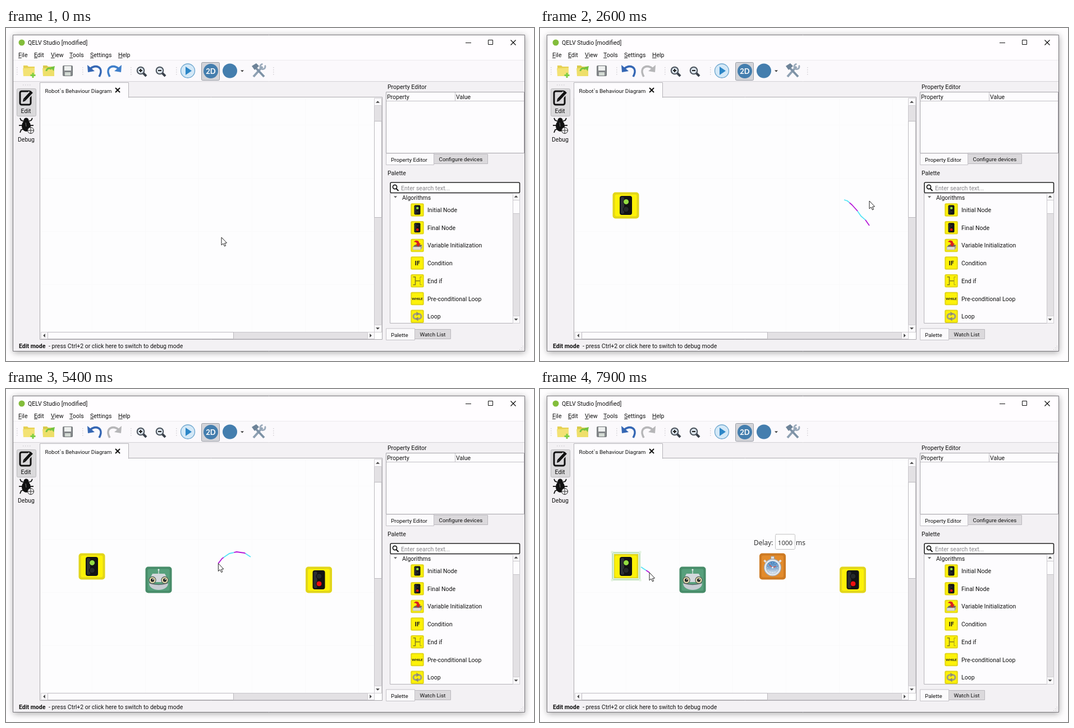
An HTML page with a canvas for the animation above (8000 ms loop, 941 by 595 pixels).

```html
<!DOCTYPE html>
<html lang="en">
<head>
<meta charset="utf-8">
<title>Diagram editor</title>
<style>
html, body { margin: 0; width: 100%; height: 100%; overflow: hidden; background: #fefdfe; }
canvas { display: block; }
</style>
</head>
<body>
<canvas id="stage" width="941" height="595"></canvas>
<script>
const LOOP = 8000, STEP = 100;
const ctx = document.getElementById('stage').getContext('2d');
const UI = '10.5px Roboto, sans-serif';
const TAB = '9.8px Roboto, sans-serif';

function box(x, y, w, h, fill, line, r = 0, lw = 1) {
  ctx.beginPath();
  ctx.roundRect(x, y, w, h, r);
  if (fill) { ctx.fillStyle = fill; ctx.fill(); }
  if (line) { ctx.strokeStyle = line; ctx.lineWidth = lw; ctx.stroke(); }
}
function disc(x, y, r, fill, line, lw = 1) {
  ctx.beginPath();
  ctx.arc(x, y, r, 0, Math.PI * 2);
  if (fill) { ctx.fillStyle = fill; ctx.fill(); }
  if (line) { ctx.strokeStyle = line; ctx.lineWidth = lw; ctx.stroke(); }
}
function poly(pts, fill) {
  ctx.beginPath();
  pts.forEach(p => ctx.lineTo(p[0], p[1]));
  ctx.closePath();
  ctx.fillStyle = fill;
  ctx.fill();
}
function line(pts, color, lw = 1) {
  ctx.beginPath();
  pts.forEach(p => ctx.lineTo(p[0], p[1]));
  ctx.strokeStyle = color;
  ctx.lineWidth = lw;
  ctx.stroke();
}
function arc(x, y, r, a, b, color, lw) {
  ctx.beginPath();
  ctx.arc(x, y, r, a, b);
  ctx.strokeStyle = color;
  ctx.lineWidth = lw;
  ctx.stroke();
}
function text(s, x, y, color = '#111', font = UI, align = 'left') {
  ctx.font = font;
  ctx.textAlign = align;
  ctx.fillStyle = color;
  ctx.fillText(s, x, y);
}
function at(x, y, scale, draw) {
  ctx.save();
  ctx.translate(x, y);
  ctx.scale(scale, scale);
  draw();
  ctx.restore();
}
function triangle(x, y, angle, color = '#444', size = 3.5) {
  ctx.save();
  ctx.translate(x, y);
  ctx.rotate(angle);
  poly([[-size, -size / 2], [size, -size / 2], [0, size / 2]], color);
  ctx.restore();
}

// Diagram blocks, drawn in a 48-unit square around the origin
function tile(fill, edge) {
  box(-23.5, -23.5, 47, 47, edge, null, 5);
  box(-19.5, -19.5, 39, 39, fill, null, 3);
}
function yellowTile() {
  tile('#fdf208', '#e2d61a');
}
function trafficLight(go) {
  yellowTile();
  box(-11, -17, 22, 34, '#121315', null, 4);
  box(-9, -15, 6, 30, '#2c3035', null, 3);
  disc(0.5, -6.5, 5, go ? '#93dc42' : '#24282a', '#0b0b0b');
  disc(0.5, 7, 5, go ? '#24282a' : '#ee1111', '#0b0b0b');
}
const blocks = {
  initial() { trafficLight(true); },
  final() { trafficLight(false); },
  variable() {
    yellowTile();
    poly([[-16, 6], [-9, -2], [17, -2], [12, 6]], '#66625c');
    box(-16, 5, 28, 11, '#dedbd6', '#9a968d');
    poly([[12, 6], [17, -2], [17, 9], [12, 16]], '#aaa69e');
    poly([[-13, -13], [-5, -18], [4, -16], [8, -7], [12, -7], [4, 5], [-6, -4], [-1, -5], [-4, -11]], '#d92020');
  },
  condition() {
    yellowTile();
    text('IF', 0, 8, '#33311c', '900 21px Lato, sans-serif', 'center');
  },
  endIf() {
    yellowTile();
    line([[-15, -14], [-7, -14], [-7, 14], [-15, 14]], '#817a20', 3);
    line([[-7, 0], [10, 0]], '#817a20', 3);
    line([[16, -14], [10, -14], [10, 14], [16, 14]], '#a69c22', 2);
  },
  whileLoop() {
    yellowTile();
    text('WHILE', 0, 5, '#33311c', '900 12px Lato, sans-serif', 'center');
  },
  loop() {
    yellowTile();
    box(-14, -9, 28, 18, null, '#a19d82', 9, 6);
    poly([[-3, -17], [7, -9], [-3, -1]], '#8e8a72');
    poly([[3, 17], [-7, 9], [3, 1]], '#8e8a72');
  },
  robot() {
    tile('#57a07c', '#478c69');
    line([[0, -18], [0, -10]], '#dde3e4', 1.3);
    disc(0, -18, 1.5, '#e9eeee');
    poly([[-14, -5], [-11, -11], [11, -11], [14, -5], [14, 4], [-14, 4]], '#d3d8dc');
    ctx.beginPath();
    ctx.moveTo(-17, 6);
    ctx.quadraticCurveTo(0, 11, 17, 6);
    ctx.bezierCurveTo(17, 22, -17, 22, -17, 6);
    ctx.fillStyle = '#c6ccd2';
    ctx.fill();
    ctx.beginPath();
    ctx.moveTo(-16, 6);
    ctx.quadraticCurveTo(0, 11, 16, 6);
    ctx.strokeStyle = '#5e696c';
    ctx.lineWidth = 1.3;
    ctx.stroke();
    for (const x of [-11, 11]) {
      disc(x, 0.5, 6, '#f0e6b4', '#55605a', 1.3);
      disc(x, 0.5, 3.2, '#26292b');
      disc(x + 1, -0.8, 1, '#fff');
    }
  },
  timer() {
    tile('#e28b2c', '#cd7a23');
    box(-3, -18, 6, 5, '#e4e2df', '#94959a', 1);
    for (const d of [-1, 1]) line([[d * 15, -11], [d * 11, -7]], '#e0e0e2', 3.5);
    const face = ctx.createLinearGradient(0, -9, 0, 13);
    face.addColorStop(0, '#3f7fbd');
    face.addColorStop(0.5, '#7fa8d0');
    face.addColorStop(1, '#dfe6f0');
    disc(0, 2, 15, '#e6ebf0', '#a5a9b0', 1.3);
    disc(0, 2, 11.5, face, '#b4c4d4', 1);
    for (let i = 0; i < 12; i++) {
      const a = i * Math.PI / 6;
      disc(9 * Math.cos(a), 2 + 9 * Math.sin(a), 0.6, '#fff');
    }
    line([[-6, -3], [0, 2], [6, 0]], '#d0504c', 1.4);
    disc(0, 2, 1.6, '#f4f4f4');
  }
};

function historyArrow(x, dir, color) {
  ctx.save();
  ctx.translate(x, 77);
  ctx.scale(dir, 1);
  ctx.beginPath();
  ctx.moveTo(-8, -4);
  ctx.bezierCurveTo(0, -13, 18, -8, 8, 10);
  ctx.strokeStyle = color;
  ctx.lineWidth = 3.6;
  ctx.stroke();
  poly([[-13, -11], [-12, 2], [0, 0]], color);
  ctx.restore();
}
function magnifier(x, plus) {
  line([[x + 3, 80], [x + 9, 86]], '#39404a', 4);
  disc(x - 1, 76, 6.3, '#d9e2ea', '#4a525c', 2);
  line([[x - 4, 76], [x + 2, 76]], '#222', 2);
  if (plus) line([[x - 1, 73], [x - 1, 79]], '#222', 2);
}
function folder(x, back, front) {
  poly([[x - 10, 67], [x - 3, 67], [x - 1, 69], [x + 10, 69], [x + 10, 86], [x - 10, 86]], back);
  poly([[x - 11, 72], [x + 10, 71], [x + 10, 86], [x - 10, 86]], front);
}

function toolbar(canRedo) {
  for (const x of [19, 136, 222, 303, 476])
    for (let y = 70; y < 86; y += 4) box(x, y, 1.5, 1.5, '#d2d0d4');
  folder(41, '#e6d052', '#f3e274');
  line([[48, 80], [48, 89]], '#7fce45', 3);
  line([[43.5, 84.5], [52.5, 84.5]], '#7fce45', 3);
  folder(76, '#d9cb4c', '#eedf6a');
  arc(77, 77, 5, Math.PI, 5.6, '#74c23f', 3);
  poly([[79, 70], [87, 68], [85, 77]], '#74c23f');
  box(101.5, 67.5, 17, 18, '#85888b', '#707477', 1);
  box(104, 68, 12, 8, '#eef0ef');
  box(105, 79, 10, 6, '#d3dad3');
  historyArrow(158, 1, '#3567b4');
  historyArrow(193, -1, canRedo ? '#3f7fca' : '#b6b6b8');
  magnifier(241, true);
  magnifier(275, false);
  disc(324, 76.5, 12.5, '#d3e8f7', '#6aa4cd', 1.3);
  poly([[320, 69], [331, 76.5], [320, 84]], '#2c86c7');
  box(348.5, 61.5, 32, 32, '#d3d4d9', '#9a9da5', 2);
  disc(365, 77, 13, '#447eae');
  text('2D', 365, 82, '#fff', 'bold 13px Lato, sans-serif', 'center');
  disc(399, 76.5, 13, '#447eae');
  triangle(421, 77, 0, '#333', 3);
  line([[441, 87], [457, 69]], '#8fa1b3', 4);
  line([[444, 70], [460, 87]], '#7d92a6', 4);
  poly([[438, 68], [446, 63], [451, 68], [443, 75]], '#6d8398');
  arc(457.5, 69, 4.5, -0.5, 4.7, '#9babbb', 3);
}

function sidebar() {
  for (let x = 30; x < 46; x += 4) box(x, 101, 1.5, 1.5, '#d2d0d4');
  box(19.5, 108.5, 34, 49, '#dad9db', '#bab9bc', 2);
  box(25, 113, 19, 24, null, '#111', 3, 3);
  line([[31, 131], [44, 116]], '#dad9db', 9);
  line([[33, 128], [46, 114]], '#111', 5);
  poly([[30, 132], [31, 126], [35, 130]], '#111');
  text('Edit', 35.5, 152, '#111', UI, 'center');
  for (const d of [-1, 1]) {
    line([[36, 168], [36 + d * 9, 165], [36 + d * 11, 161]], '#111', 1.8);
    line([[36, 174], [36 + d * 13, 174]], '#111', 1.8);
    line([[36, 179], [36 + d * 9, 182], [36 + d * 11, 187]], '#111', 1.8);
  }
  ctx.beginPath();
  ctx.ellipse(36, 175, 8, 10, 0, 0, Math.PI * 2);
  ctx.fillStyle = '#111';
  ctx.fill();
  disc(36, 165, 4.5, '#111');
  line([[35, 169], [36, 176]], '#777', 1);
  disc(44, 183, 5.5, '#f4f3f5', '#222');
  line([[38, 183], [50, 183]], '#333');
  line([[44, 177], [44, 189]], '#333');
  text('Debug', 36, 202.5, '#111', UI, 'center');
}

function editorPane() {
  box(60.5, 123.5, 610, 433, '#fff', '#aaa8ad');
  box(60.5, 97.5, 158, 27, '#fdfcfe', '#b5b3b8');
  box(61, 123, 157, 3, '#fdfcfe');
  text('Robot`s Behaviour Diagram', 69.5, 115.5, '#111', TAB);
  line([[195, 107], [203, 115]], '#111', 2);
  line([[203, 107], [195, 115]], '#111', 2);
  box(62, 126, 594, 417, '#fdfdfe');
  for (let x = 153.5; x < 656; x += 95) line([[x, 126], [x, 543]], '#fafafb');
  for (let y = 173.5; y < 543; y += 95) line([[62, y], [656, y]], '#fafafb');
  box(656.5, 125.5, 13, 418, '#e3e1e4', '#c8c6ca');
  box(656.5, 125.5, 13, 13, '#fbfafc', '#d0ced2');
  box(656.5, 166.5, 13, 172, '#fdfcfe', '#bbb9be');
  box(656.5, 530.5, 13, 13, '#fbfafc', '#d0ced2');
  triangle(662.5, 132, Math.PI);
  triangle(662.5, 537, 0);
  box(62.5, 543.5, 594, 12, '#e3e1e4', '#c8c6ca');
  box(62.5, 543.5, 12, 12, '#fbfafc', '#d0ced2');
  box(74.5, 543.5, 331, 12, '#fdfcfe', '#bbb9be');
  box(644.5, 543.5, 12, 12, '#fbfafc', '#d0ced2');
  triangle(68, 549.5, Math.PI / 2);
  triangle(650, 549.5, -Math.PI / 2);
}

function dockTabs(y, split, end, active, other) {
  box(split + .5, y + 1.5, end - split, 17, '#dbd9dc', '#bbb9be');
  box(677.5, y, split - 677, 20.5, '#fbfafc', '#c4c2c7');
  text(active, 686, y + 14.5, '#111', TAB);
  text(other, split + 9.5, y + 13.5, '#111', TAB);
}

function docks() {
  text('Property Editor', 680, 109);
  box(677.5, 114.5, 246, 109, '#fdfcfe', '#a5a3a8');
  line([[678, 130.5], [923, 130.5]], '#c2c0c5');
  line([[800.5, 115], [800.5, 131]], '#c2c0c5');
  text('Property', 679, 127);
  text('Value', 802, 127);
  dockTabs(224, 762, 858, 'Property Editor', 'Configure devices');
  text('Palette', 680, 263);
  box(685, 276, 230.5, 18.5, '#fff', '#222', 2, 1.6);
  disc(693, 284, 3.6, null, '#111', 1.7);
  line([[695.5, 287], [699.5, 291]], '#111', 2);
  text('Enter search text...', 704, 289.5, '#858388');

  box(684.5, 295.5, 231, 232, '#fdfcfe', '#b5b3b8');
  triangle(694, 302, 0, '#555', 3);
  text('Algorithms', 706, 306.5);
  ctx.save();
  ctx.beginPath();
  ctx.rect(685, 296, 218, 231);
  ctx.clip();
  [['initial', 'Initial Node'], ['final', 'Final Node'], ['variable', 'Variable Initialization'],
   ['condition', 'Condition'], ['endIf', 'End if'], ['whileLoop', 'Pre-conditional Loop'],
   ['loop', 'Loop']].forEach(([kind, label], i) => {
    const y = 325 + i * 31.7;
    at(733, y, 0.5, blocks[kind]);
    text(label, 751, y + 4);
  });
  ctx.restore();
  box(903.5, 295.5, 12, 232, '#e3e1e4', '#c8c6ca');
  box(903.5, 295.5, 12, 36, '#fdfcfe', '#c8c6ca');
  line([[904, 307.5], [915, 307.5]], '#c8c6ca');
  box(903.5, 514.5, 12, 13, '#fbfafc', '#d0ced2');
  triangle(909, 301, Math.PI);
  triangle(909, 521, 0);
  dockTabs(537, 728, 792, 'Palette', 'Watch List');
}

function windowFrame() {
  box(0, 0, 941, 595, '#fefdfe');
  ctx.save();
  ctx.shadowColor = 'rgba(0,0,0,.35)';
  ctx.shadowBlur = 11;
  ctx.shadowOffsetY = 2;
  box(13, 12, 912, 566, '#f3f1f4');
  ctx.restore();
  box(13, 12, 912, 46, '#fffdff');
  box(13, 58, 912, 38, '#fbf9fc');
  line([[13, 57.5], [924, 57.5]], '#eceaed');
  line([[13, 95.5], [924, 95.5]], '#d4d2d6');
  box(12.5, 12.5, 912, 565, null, '#77757a');
  disc(28, 26, 5.5, '#83bd3b');
  text('QELV Studio [modified]', 39, 30);
  line([[819, 26.5], [829, 26.5]], '#111');
  box(859.5, 21.5, 8, 8, null, '#111');
  line([[899.5, 21.5], [908.5, 30.5]], '#111', 1.2);
  line([[908.5, 21.5], [899.5, 30.5]], '#111', 1.2);
  [['File', 22], ['Edit', 50], ['View', 80], ['Tools', 113], ['Settings', 150], ['Help', 200]]
    .forEach(([name, x]) => {
      text(name, x, 52);
      line([[x, 53.5], [x + ctx.measureText(name[0]).width, 53.5]], '#222');
    });
  text('Edit mode', 23, 572, '#111', 'bold ' + UI);
  text('- press Ctrl+2 or click here to switch to debug mode', 76, 572);
  for (let i = 0; i < 3; i++)
    for (let j = 0; j <= i; j++) box(921 - j * 3, 568 + i * 3, 1, 1, '#bbb');
}

// Pen gestures: drawn between from and to, erased at clear; the pointer arrives beforehand
const strokes = [
  { pts: [[384, 374]], arrive: 0, from: 0, to: 0, clear: 0 },
  { pts: [[176, 294], [162, 295], [152, 296], [139, 305], [131, 315], [127, 328], [127, 338], [133, 350],
          [145, 360], [154, 364], [166, 364], [177, 358], [185, 348], [188, 333], [188, 318], [187, 304],
          [182, 296], [175, 293.5], [164, 296]],
    arrive: 300, from: 300, to: 1300, clear: 1600 },
  { pts: [[542, 307], [548, 309], [556, 316], [565, 326], [572, 336], [580, 343], [587, 353]],
    arrive: 1700, from: 1900, to: 2400, clear: 3100 },
  { pts: [[587, 309], [565, 331], [543, 354]], arrive: 2600, from: 2600, to: 2900, clear: 3100 },
  { pts: [[267, 294], [264, 306], [264, 350], [270, 366], [284, 370], [298, 364], [302, 348], [301, 296]],
    arrive: 3300, from: 3480, to: 4400, clear: 4700 },
  { pts: [[436, 300], [425, 293], [411, 291], [398, 294], [385, 303], [375, 316], [371, 330], [373, 344],
          [382, 356], [395, 363], [415, 366], [430, 362], [441, 351], [450, 338], [454, 322], [449, 308],
          [437, 299], [425, 293], [414, 293]],
    arrive: 4800, from: 5100, to: 6300, clear: 6700 },
  { pts: [[180, 318], [186, 322], [195, 328]], arrive: 7100, from: 7300, to: 7900, clear: LOOP }
];
const dist = (a, b) => Math.hypot(b[0] - a[0], b[1] - a[1]);
const mix = (a, b, k) => [a[0] + (b[0] - a[0]) * k, a[1] + (b[1] - a[1]) * k];
const clamp = k => Math.min(1, Math.max(0, k));

function partial(s, t) {
  const total = s.pts.slice(1).reduce((sum, p, i) => sum + dist(s.pts[i], p), 0);
  let left = total * clamp((t - s.from) / (s.to - s.from || 1));
  const out = [s.pts[0]];
  for (let i = 1; i < s.pts.length && left > 0; i++) {
    const d = dist(s.pts[i - 1], s.pts[i]);
    out.push(mix(s.pts[i - 1], s.pts[i], Math.min(1, left / d)));
    left -= d;
  }
  return out;
}
function drawStroke(s, t) {
  if (t <= s.from || t >= s.clear) return;
  const pts = partial(s, t);
  ctx.save();
  ctx.lineJoin = 'round';
  ctx.setLineDash([21, 21]);
  ctx.lineDashOffset = 10;
  line(pts, '#55e4f5', 1.8);
  ctx.lineDashOffset = -11;
  line(pts, '#b517d8', 1.8);
  ctx.restore();
}
function pointer(t) {
  const next = strokes.findIndex(s => t < s.to);
  if (next < 0) return strokes.at(-1).pts.at(-1);
  const s = strokes[next];
  if (t >= s.from) return partial(s, t).at(-1);
  const prev = strokes[next - 1];
  const k = clamp((t - prev.to) / (s.arrive - prev.to));
  return mix(prev.pts.at(-1), s.pts[0], k * k * (3 - 2 * k));
}
function drawPointer([x, y]) {
  at(x, y, 1, () => {
    ctx.beginPath();
    [[0, 0], [0, 14], [3, 11], [5.5, 16], [7.5, 15], [5.5, 10.5], [9.5, 10]]
      .forEach(p => ctx.lineTo(p[0], p[1]));
    ctx.closePath();
    ctx.fillStyle = '#fff';
    ctx.fill();
    ctx.strokeStyle = '#222';
    ctx.lineWidth = 1;
    ctx.stroke();
  });
}

function selection(x, y) {
  box(x - 23.5, y - 23.5, 47, 47, null, '#d9efd3', 1, 4);
  box(x - 24.5, y - 24.5, 49, 49, null, '#a9d3ae');
  for (const dx of [-25, 25])
    for (const dy of [-25, 25]) box(x + dx - 2, y + dy - 2, 4, 4, '#e3f2e0');
}

function diagram(t) {
  if (t >= 1600) at(153, 317, 1, blocks.initial);
  if (t >= 7400) selection(153.5, 316.5);
  if (t >= 3100) at(557.5, 341, 1, blocks.final);
  if (t >= 4700) at(272, 341, 1, blocks.robot);
  if (t >= 6700) {
    const label = '12px "Open Sans", sans-serif';
    at(414.5, 317, 1, blocks.timer);
    text('Delay:', 381, 279, '#222', label);
    ctx.save();
    ctx.setLineDash([1, 1]);
    box(419.5, 259.5, 35, 27, '#fff', '#888', 2);
    ctx.restore();
    text('1000', 437, 279, '#222', '11.5px "Open Sans", sans-serif', 'center');
    text('ms', 456, 279, '#222', label);
  }
}

function render(t) {
  windowFrame();
  toolbar(t < 1600);
  sidebar();
  editorPane();
  docks();
  diagram(t);
  strokes.forEach(s => drawStroke(s, t));
  drawPointer(pointer(t));
}

const start = performance.now();
function tick() {
  const t = (performance.now() - start) % LOOP;
  render(Math.floor(t / STEP) * STEP);
  requestAnimationFrame(tick);
}
tick();
</script>
</body>
</html>
```
